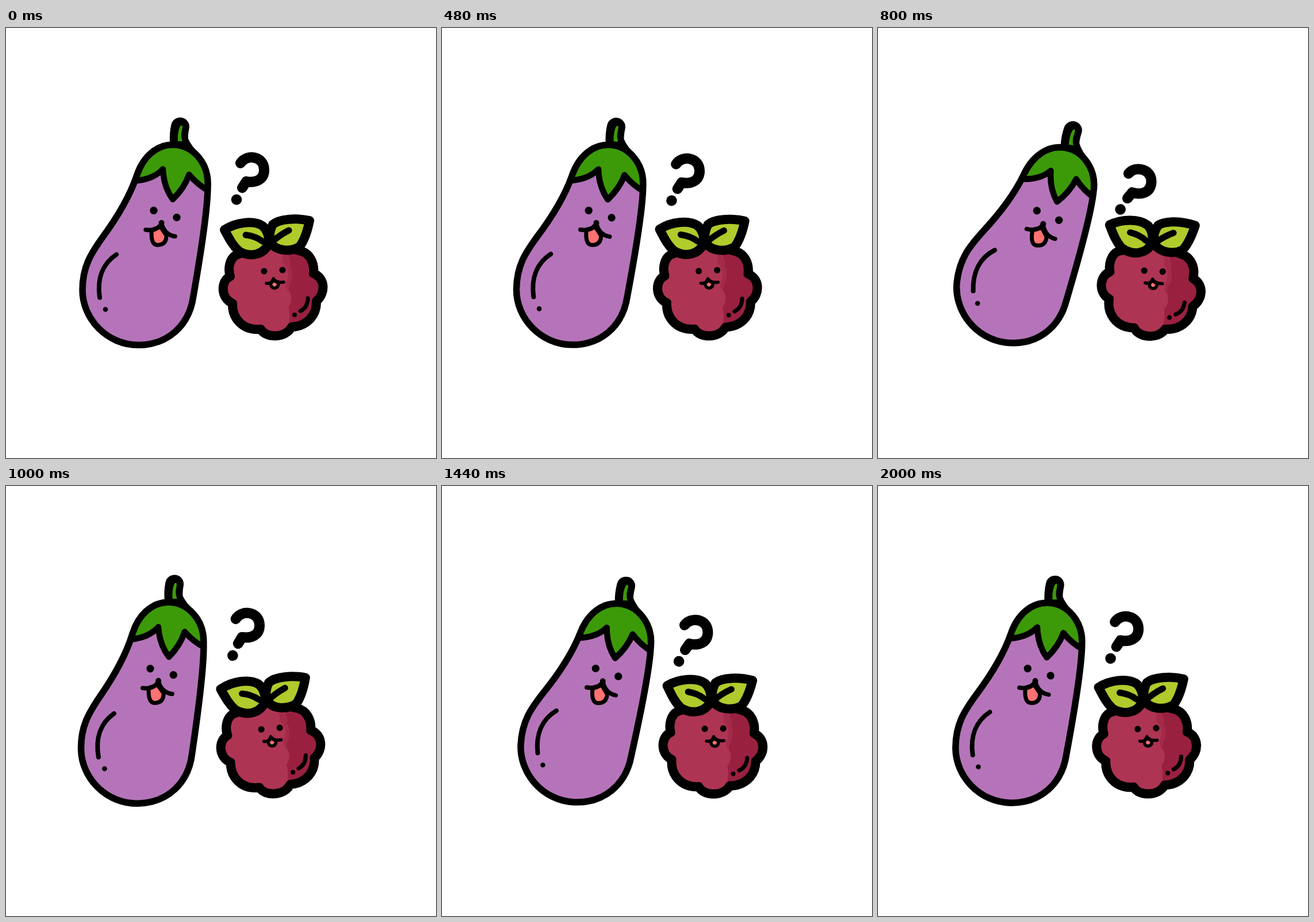
Recreate the animation shown at these times as an HTML page. Size 748 by 748 pixels, loop 2080 ms.

```html
<!DOCTYPE html>
<html lang="en">
<head>
<meta charset="utf-8">
<title>Eggplant and raspberry</title>
<style>
  html, body { margin: 0; height: 100%; overflow: hidden; background: #fff; }
  svg { display: block; width: 100vw; height: 100vh; }
  .line { fill: none; stroke: #000; stroke-linecap: round; stroke-linejoin: round; }
  .tongue { fill: #ff7272; }
  .leaf { fill: #b0cb2c; stroke-width: 16; }
</style>
</head>
<body>
<svg viewBox="0 0 748 748">
  <defs>
    <path id="body" d="M290 203C325 203 353 235 351 275C351 308 341 380 326 466C319 518 281 551.500 230 551.500C176 551.500 133 506 133 456C133 415 148 392 168 364C190 334 214 296 227 258C238 224 262 203 290 203Z"/>
    <path id="berryShape" d="M400 395C388 402 386 420 390 432C373 440 373 470 394 479C393 505 412 527 443 524C452 540 486 540 497 520C521 519 541 502 540 475C556 462 556 435 535 427C537 408 528 392 513 388L458 374Z"/>
    <clipPath id="inBody"><use href="#body"/></clipPath>
    <clipPath id="inBerry"><use href="#berryShape"/></clipPath>
  </defs>

  <g id="eggplant">
    <path class="line" stroke-width="32" d="M301 200Q300 185 303 171.500"/>
    <path d="M312 180Q318 200 331 213L305 206Z"/>
    <use href="#body" fill="#b574b9"/>
    <g clip-path="url(#inBody)">
      <path class="line" stroke-width="10.500" style="fill:#3c9a09" d="M222 266Q256 264 273 245.500Q274 276 290 298Q310 279 318.500 255Q335 275 358 286V190H222Z"/>
    </g>
    <use href="#body" class="line" stroke-width="11.500"/>
    <path fill="#3c9a09" d="M299 197C298 185 301 172 304 170C308 168 307 174 306 178C304 186 305 192 307 197Z"/>
    <circle cx="257" cy="317.500" r="6.700"/>
    <circle cx="297" cy="329.500" r="6.700"/>
    <path class="line tongue" stroke-width="7" d="M253.500 351Q251 377.500 264 377.500Q279 377 279 361L269 346Z"/>
    <path class="line" stroke-width="7.500" d="M243 351Q263 354 270.500 340Q276 360 294 362.500"/>
    <circle cx="270.500" cy="339" r="5"/>
    <path class="line" stroke-width="8" d="M192 394C168 410 158 436 163 469"/>
    <circle cx="173" cy="489.500" r="4.300"/>
    <path class="line" stroke-width="18" d="M408 235C418 219 449 222 449 247C449 264 434 270 418 267L411 278"/>
    <circle cx="401" cy="298.500" r="9.300"/>
  </g>

  <g id="berry">
    <use href="#berryShape" fill="#ae3453"/>
    <g clip-path="url(#inBerry)">
      <path fill="#9a2040" d="M482 380Q496 402 493 412Q502 428 494 444Q488 452 494 460Q500 474 491 486Q496 500 489 540H570V380Z"/>
      <path fill="#a42a4a" d="M480 390Q499 402 494 413Q501 430 494 446Q490 454 494 460Q483 452 489 438Q494 420 482 410Z"/>
    </g>
    <use href="#berryShape" class="line" stroke-width="16"/>
    <path class="line leaf" d="M380 351C400 338 430 334 446 344Q456 352 458 372C450 395 425 400 405 388C394 378 388 366 380 351Z"/>
    <path class="line leaf" d="M528 335C505 330 475 332 464 342Q457 355 459 372C470 389 495 390 511 380C520 368 525 350 528 335Z"/>
    <path class="line" stroke-width="11" d="M417 360Q434 362 446 371L460 375Q474 361 492 352"/>
    <circle cx="449" cy="423" r="5.600"/>
    <circle cx="481" cy="421" r="5.600"/>
    <path class="line tongue" stroke-width="5.500" d="M460.500 444.500Q461 452 467 452.500Q474 452 474 443.500L465.500 439Z"/>
    <path class="line" stroke-width="5.500" d="M453 444Q462 446 465 436Q470 444 483 442"/>
    <path class="line" stroke-width="7" d="M525 470Q525 486 512 492.500"/>
    <circle cx="502" cy="499" r="4"/>
  </g>
</svg>
<script>
const LOOP = 2080, STEP = 40;

// time in ms, tilt in degrees, sideways shift
const keys = [
  [0, 0, 0], [200, -4.2, -8.7], [270, -5, -11], [480, 0.7, -3.5],
  [560, 3.6, 2.5], [740, 7.1, 4.6], [800, 6.6, 3.7], [1000, -1.5, -2.5],
  [1090, -3, -4.5], [1440, 2.65, 4], [1480, 2.65, 4], [1740, -2, -1.8],
  [2000, 0.6, 1.9], [2040, 0.6, 1.9], [LOOP, 0, 0]
];
const spans = keys.length - 1;

// average speed over span i, wrapping around the loop
function speed(i, part) {
  const n = (i + spans) % spans, a = keys[n], b = keys[n + 1];
  return (b[part] - a[part]) / (b[0] - a[0]);
}

// harmonic mean keeps the curve from overshooting its keys
function slope(i, part) {
  const p = speed(i - 1, part), q = speed(i, part);
  return p * q > 0 ? 2 * p * q / (p + q) : 0;
}

function sample(t, part) {
  const i = keys.findIndex(k => k[0] > t) - 1;
  const a = keys[i], b = keys[i + 1], d = b[0] - a[0], u = (t - a[0]) / d;
  const ease = u * u * (3 - 2 * u);
  return a[part] + (b[part] - a[part]) * ease
    + d * u * (1 - u) * ((1 - u) * slope(i, part) - u * slope(i + 1, part));
}

function pose(id, tilt, shift, x, y) {
  document.getElementById(id).setAttribute("transform", `translate(${shift} 0) rotate(${tilt} ${x} ${y})`);
}

const start = performance.now();
function draw() {
  const t = Math.floor((performance.now() - start) % LOOP / STEP) * STEP;
  const tilt = sample(t, 1), shift = sample(t, 2);
  pose("eggplant", tilt, shift, 262, 454);
  pose("berry", tilt, shift, 463, 513);
  requestAnimationFrame(draw);
}
draw();
</script>
</body>
</html>
```
